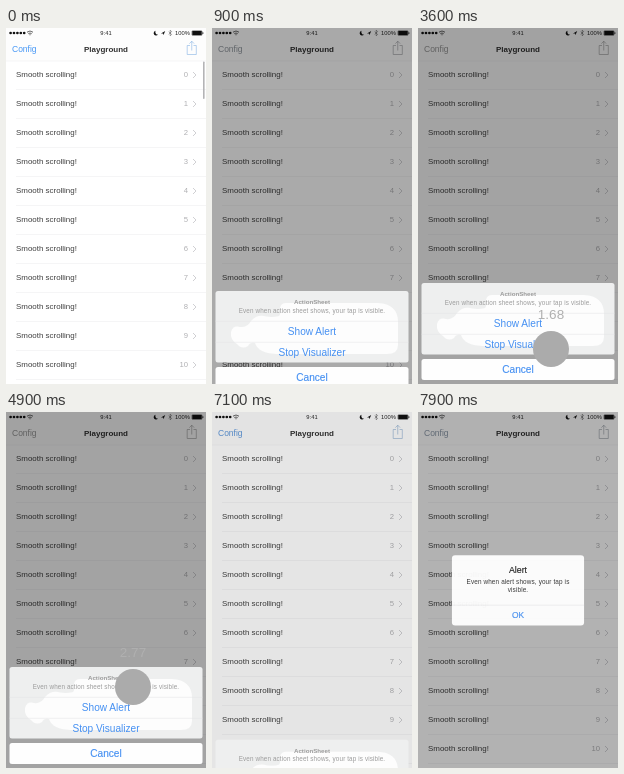
Recreate the animation shown at these times as an HTML page. Size 200 px wide and 356 px high, loop 8 s.

```html
<!DOCTYPE html>
<html lang="en">
<head>
<meta charset="utf-8">
<title>Playground</title>
<style>
  html, body { margin: 0; width: 100%; height: 100%; overflow: hidden; background: #fff; }
  svg { display: block; width: 100vw; height: 100vh; }
  text { font-family: "Liberation Sans", Arial, sans-serif; }
  .row { font-size: 7.95px; fill: #404040; }
  .num { font-size: 7.7px; fill: #b0b0b3; text-anchor: end; }
  .mid { text-anchor: middle; }
  .bold { font-weight: bold; }
  .action { font-size: 10.1px; fill: #4590f2; text-anchor: middle; }
  .medium { stroke: currentColor; stroke-width: .15; }
  .small { font-size: 6.3px; letter-spacing: .13px; text-anchor: middle; }
  .hair { stroke: #e0e0e2; stroke-width: .5; }
  .faint { stroke: #eeeef0; stroke-width: .6; }
  .status { font-size: 5.8px; fill: #222; }
</style>
</head>
<body>
<svg viewBox="0 0 200 356" preserveAspectRatio="none">
  <rect width="200" height="356" fill="#fff"/>
  <g id="list"></g>
  <rect width="200" height="33" fill="#fdfdfd"/>
  <path class="faint" d="M0 33H200"/>

  <g id="dots" fill="#111"></g>
  <g fill="none" stroke="#222" stroke-width=".7">
    <path d="M21 4.2Q24 1.8 27 4.2M22.3 5.7Q24 4.3 25.7 5.7"/>
    <path d="M162.8 3.6L165.6 6.5L164.2 7.8V2.2L165.6 3.5L162.8 6.4" stroke-width=".4"/>
    <rect x="186" y="2.8" width="10" height="4.6" rx=".7" stroke-width=".5"/>
  </g>
  <path d="M23.2 6.6H24.8L24 7.6ZM149.6 2.8A2.4 2.4 0 1 0 152 6.6A2.6 2.6 0 0 1 149.6 2.8ZM155 5.4L159.2 3L157.4 7.3L157.1 5.5ZM186.3 3.1H195.7V7.1H186.3ZM196.5 4.3H197.3V5.9H196.5Z" fill="#111"/>
  <text class="status mid" x="100" y="7.2">9:41</text>
  <text class="status" x="169" y="7.2">100%</text>

  <text id="config" x="6" y="23.7" font-size="8.5">Config</text>
  <text class="mid bold" x="100" y="23.7" font-size="8" fill="#303030">Playground</text>
  <path id="share" d="M184 17.5H181.2V26.5H190.3V17.5H187.5M185.75 22.5V13.2M183.4 15.6L185.75 13.2L188.1 15.6" fill="none" stroke-width=".6"/>
  <rect id="bar" x="197" y="33.5" width="1.6" height="37.5" rx=".8" fill="#b4b4b6"/>
  <rect id="dim" width="200" height="356"/>

  <g id="sheet">
    <rect x="3.5" y="255" width="193" height="71.5" rx="2.5" fill="#eeefef"/>
    <path fill="#fdfdfd" d="M74 267H166Q186 268 186 286V309Q186 318 175 318H64Q46 317 43 307Q38 306 36 310Q30 314 25 308Q18 304 19 296Q21 289 28 291Q35 292 39 285Q44 279 52 280Q60 282 67 280Q69 278 68 272Q69 267 74 267Z"/>
    <path class="hair" d="M3.5 285.3H196.5M3.5 306.3H196.5"/>
    <text class="mid bold" x="100" y="268.2" font-size="6.2" fill="#9c9c9c">ActionSheet</text>
    <text class="small" x="100" y="276.6" fill="#9c9c9c">Even when action sheet shows, your tap is visible.</text>
    <text class="action" x="100" y="299.4">Show Alert</text>
    <text class="action" x="100" y="320.4">Stop Visualizer</text>
    <rect x="3.5" y="331" width="193" height="21" rx="2.5" fill="#fefefe"/>
    <text class="action medium" x="100" y="345" color="#4590f2">Cancel</text>
  </g>

  <g id="alert">
    <rect x="34.8" y="143.6" width="130.4" height="69.4" rx="3.2" fill="#fefefe"/>
    <path class="hair" d="M34.8 193H165.2"/>
    <text class="mid medium" x="100" y="160.9" font-size="8.7" fill="#222" color="#222">Alert</text>
    <text class="small" x="100" y="172.4" fill="#383838">Even when alert shows, your tap is</text>
    <text class="small" x="100" y="180.2" fill="#383838">visible.</text>
    <text class="mid medium" x="100" y="206" font-size="8.3" fill="#4590f2" color="#4590f2">OK</text>
  </g>

  <g id="touch">
    <circle r="18" fill="#ababab"/>
    <text id="count" class="mid" y="-30.5" font-size="13.5" fill="#b0b0b0"></text>
  </g>
</svg>
<script>
const LOOP = 8000, STEP = 100;
const SHEET_IN = 480, SHEET_OUT = 6850, ALERT_IN = 7720;
const TOUCH_ON = 2600, TOUCH_OFF = 6300;
// time, x, y of the finger
const PATH = [[2900, 133, 322], [3600, 133, 321], [4900, 127, 275], [6200, 125, 271]];

const $ = id => document.getElementById(id);
const clamp = v => Math.max(0, Math.min(1, v));
const mix = (a, b, p) => a + (b - a) * p;
const tint = (a, b, p) => `rgb(${a.map((v, i) => Math.round(mix(v, b[i], p)))})`;
const show = (id, alpha) => $(id).setAttribute('opacity', alpha);
const place = (id, value) => $(id).setAttribute('transform', value);

// critically damped spring, 0 to 1
function spring(ms, rate) {
  const x = Math.max(0, ms) * rate;
  return 1 - (1 + x) * Math.exp(-x);
}

function build() {
  let rows = '';
  for (let i = 0; i < 12; i++) {
    const y = 47 + 29 * i;
    rows += `<text class="row" x="10" y="${y + 2.4}">Smooth scrolling!</text>
      <text class="num" x="182" y="${y + 2.4}">${i}</text>
      <path d="M187 ${y - 3}L190 ${y}L187 ${y + 3}" fill="none" stroke="#c4c4c8" stroke-width=".8"/>
      <path class="faint" d="M10 ${y + 14.5}H200"/>`;
  }
  $('list').innerHTML = rows;
  let dots = '';
  for (let i = 0; i < 5; i++) dots += `<circle cx="${4.6 + 3.4 * i}" cy="5" r="1.35"/>`;
  $('dots').innerHTML = dots;
}

function finger(t) {
  if (t <= PATH[0][0]) return PATH[0].slice(1);
  for (let i = 1; i < PATH.length; i++) {
    const [t0, x0, y0] = PATH[i - 1], [t1, x1, y1] = PATH[i];
    if (t <= t1) {
      const p = (t - t0) / (t1 - t0), e = p * p * (3 - 2 * p);
      return [mix(x0, x1, e), mix(y0, y1, e)];
    }
  }
  return PATH[PATH.length - 1].slice(1);
}

function draw(t) {
  const up = spring(t - SHEET_IN, .01) * (1 - spring(t - SHEET_OUT, .01));
  const pop = spring(t - ALERT_IN, .018);
  const shade = Math.max(up, pop);

  show('bar', clamp(1 - t / 300));
  show('dim', .36 * shade);
  $('config').setAttribute('fill', tint([72, 152, 245], [150, 150, 150], shade));
  $('share').setAttribute('stroke', tint([135, 180, 228], [150, 150, 150], shade));

  place('sheet', `translate(0 ${102 * (1 - up)})`);
  show('sheet', up > .004 ? 1 : 0);

  const scale = 1 + .08 * (1 - pop);
  place('alert', `translate(100 178.3) scale(${scale}) translate(-100 -178.3)`);
  show('alert', clamp(pop * 1.15));

  const down = t >= TOUCH_ON && t < TOUCH_OFF;
  show('touch', down ? 1 : 0);
  if (down) {
    place('touch', `translate(${finger(t).join(' ')})`);
    $('count').textContent = (1.68 + (t - 3600) * 1.09 / 1300).toFixed(2);
  }
}

build();
const start = performance.now();
function tick() {
  const t = (performance.now() - start) % LOOP;
  draw(Math.floor(t / STEP) * STEP);
  requestAnimationFrame(tick);
}
tick();
</script>
</body>
</html>
```
